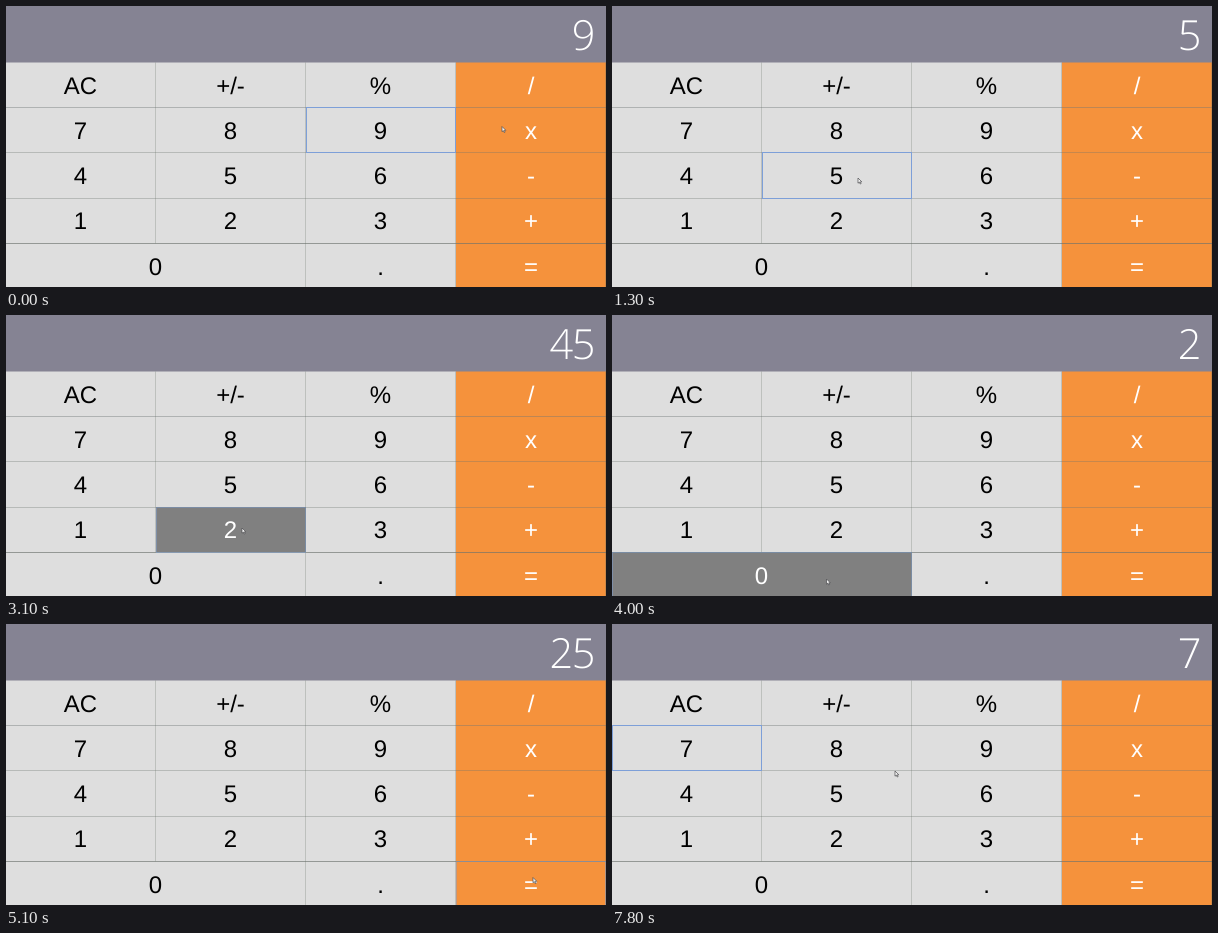
An HTML page that plays this animation: 600 px wide and 281 px high, repeating every 8 s.

```html
<!DOCTYPE html>
<html lang="en">
<head>
<meta charset="utf-8">
<title>Calculator</title>
<style>
html, body { margin: 0; width: 100%; height: 100%; overflow: hidden; background: #858393; }
svg { display: block; width: 100vw; height: 100vh; }
text { font: 24px "Liberation Sans", Arial, sans-serif; text-anchor: middle; text-rendering: geometricPrecision; }
#display { font: 300 41.5px "Open Sans", "Noto Sans", sans-serif; letter-spacing: -1.5px; text-anchor: end; fill: #fff; }
.line { stroke: #667066; stroke-opacity: .27; }
.line.strong { stroke-opacity: .55; }
#ring { fill: none; stroke: #7d9fd8; }
#cursor { fill: #f4f4f4; stroke: #4c4c50; stroke-width: .7; }
</style>
</head>
<body>
<svg viewBox="0 0 600 281" preserveAspectRatio="none">
  <rect width="600" height="57" fill="#858393"/>
  <text id="display" x="588" y="44"></text>
  <g id="keys"></g>
  <g id="lines"></g>
  <rect id="ring"/>
  <path id="cursor" d="M0 0V5.2L1.3 4.1L2.2 6L3.1 5.6L2.3 3.8H3.8Z"/>
</svg>
<script>
const ROWS = ["AC +/- % /", "7 8 9 x", "4 5 6 -", "1 2 3 +", "0 . ="].map(row => row.split(" "));
const TOP = 56.5, ROW = 45.2, COL = 150, LOOP = 8000;
const byId = id => document.getElementById(id);
const pixel = v => Math.floor(v) + .5;

function add(parent, tag, attrs, content = "") {
  const node = document.createElementNS("http://www.w3.org/2000/svg", tag);
  for (const name in attrs) node.setAttribute(name, attrs[name]);
  node.textContent = content;
  return parent.appendChild(node);
}

const keys = {};
const line = (x1, y1, x2, y2, kind = "") =>
  add(byId("lines"), "line", { x1, y1, x2, y2, class: "line " + kind });

ROWS.forEach((labels, r) => {
  const y = TOP + r * ROW;
  let x = 0;
  labels.forEach((label, i) => {
    const width = label === "0" ? 2 * COL : COL;
    const orange = i === labels.length - 1;
    const rect = add(byId("keys"), "rect", { x, y, width, height: ROW });
    const center = x + (orange ? width : width - 1) / 2;
    const text = add(byId("keys"), "text", { x: center, y: y + 31.2 }, label);
    keys[label] = { x, y, width, orange, rect, text };
    x += width;
    if (!orange) line(x - .5, y, x - .5, y + ROW);
  });
  if (r) line(0, pixel(y), 600, pixel(y), r === 4 ? "strong" : "");
});
line(599.5, TOP, 599.5, 281);

// Each step: time, display, focused key, pressed?, cursor x, cursor y
const STEPS = [
  [0, "9", "9", false, 496, 120.5],
  [100, "9", "9", false, 502.5, 120.5],
  [1000, "9", "x", true, 502.5, 120.5],
  [1100, "9", "5", true, 246, 172],
  [1300, "5", "5", false, 246, 172],
  [1400, "5", "5", false, 250, 172],
  [1800, "5", "5", false, 300, 172],
  [1900, "5", "5", false, 420, 171],
  [2000, "5", "5", false, 510, 170],
  [2100, "5", "-", true, 522, 169.5],
  [2700, "45", "-", false, 520, 171],
  [2800, "45", "-", false, 426, 196],
  [3100, "45", "2", true, 236, 213],
  [3200, "2", "2", false, 214.5, 264],
  [4000, "2", "0", true, 214.5, 264],
  [4100, "20", "=", true, 527, 253.5],
  [5100, "25", "=", false, 527, 253.5],
  [6100, "25", "7", true, 124.5, 126],
  [7700, "7", "7", false, 150, 130],
  [7800, "7", "7", false, 283, 147]
];

function paintKey(key, pressed) {
  key.rect.setAttribute("fill", pressed ? "#808080" : key.orange ? "#f5923c" : "#dedede");
  key.text.setAttribute("fill", pressed || key.orange ? "#fff" : "#000");
}

function show([, value, focus, pressed, x, y]) {
  byId("display").textContent = value;
  for (const label in keys) paintKey(keys[label], pressed && label === focus);
  const key = keys[focus], ring = byId("ring");
  const top = pixel(key.y);
  ring.setAttribute("x", key.x + .5);
  ring.setAttribute("y", top);
  ring.setAttribute("width", key.width - 1);
  ring.setAttribute("height", pixel(key.y + ROW) - top);
  ring.setAttribute("opacity", pressed || key.orange ? .45 : 1);
  byId("cursor").setAttribute("transform", `translate(${x} ${y})`);
}

let current;
const start = performance.now();
function tick() {
  const time = (performance.now() - start) % LOOP;
  const step = STEPS.findLast(([at]) => at <= time);
  if (step !== current) show(current = step);
  requestAnimationFrame(tick);
}
tick();
</script>
</body>
</html>
```
